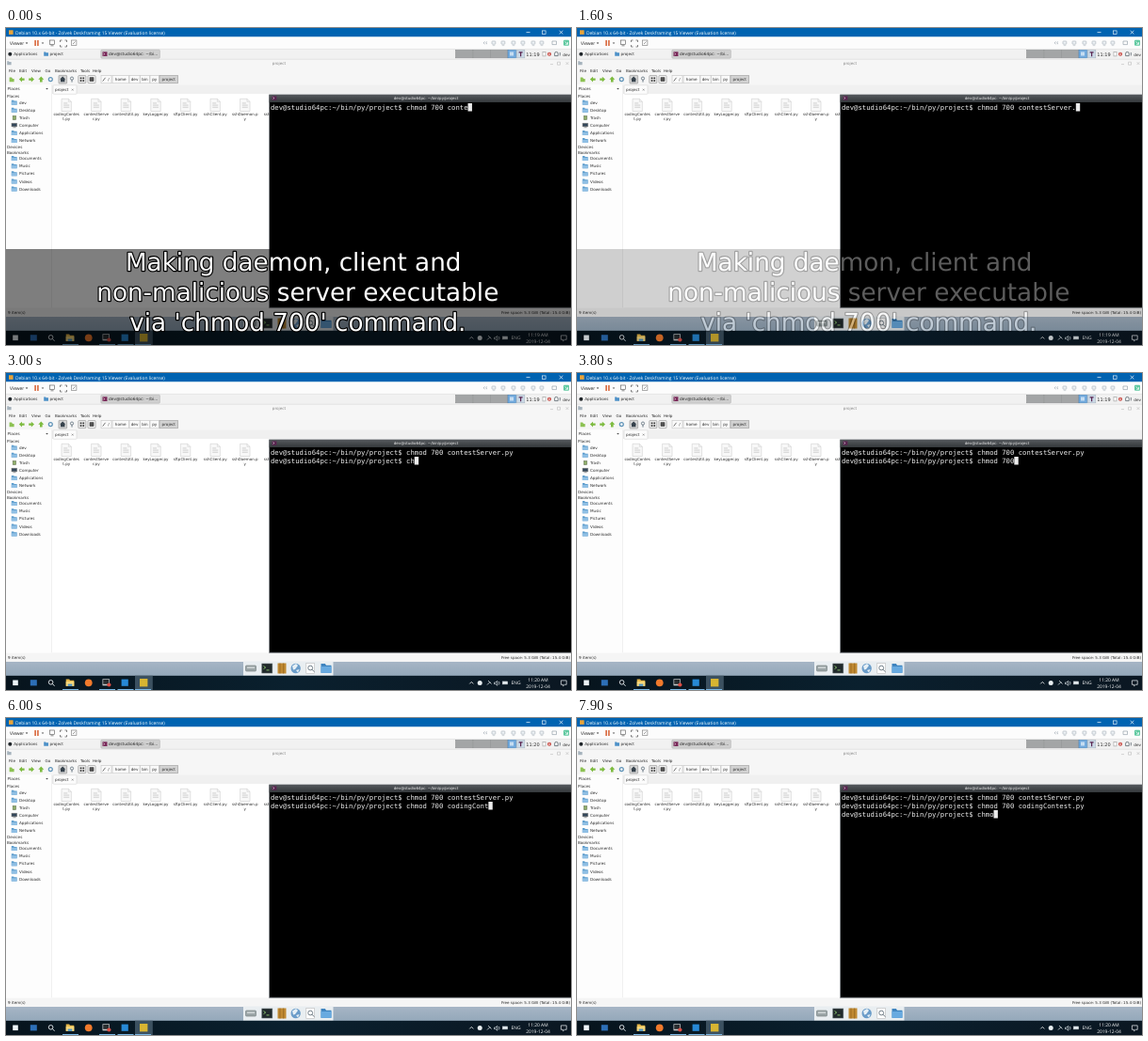
An HTML page for the animation above (8 s loop, 600x337 px).

```html
<!DOCTYPE html>
<html lang="en">
<head>
<meta charset="utf-8">
<title>Terminal session</title>
<style>
  html, body { margin: 0; width: 100%; height: 100%; overflow: hidden; background: #fff; }
  svg { display: block; width: 100vw; height: 100vh; }
  text { white-space: pre; text-rendering: geometricPrecision; }
  .guest { font-family: "DejaVu Sans", sans-serif; font-size: 4.15px; fill: #2b2b2b; }
  .host { font-family: "Open Sans", "Noto Sans", sans-serif; font-size: 4.9px; fill: #222; }
  .shell { font-family: "DejaVu Sans Mono", monospace; font-size: 7.25px; fill: #eee; }
  .caption { font-family: "DejaVu Sans", sans-serif; font-size: 26.25px; fill: #fff;
    stroke: #000; stroke-width: 2.4; stroke-linejoin: round; paint-order: stroke; text-anchor: middle; }
  .mid { text-anchor: middle; }
  .end { text-anchor: end; }
</style>
</head>
<body>
<svg id="stage" viewBox="0 0 600 337" preserveAspectRatio="none">
  <defs>
    <linearGradient id="wall" x2="0" y2="1">
      <stop offset="0" stop-color="#a6b5c5"/><stop offset="1" stop-color="#94a8ba"/>
    </linearGradient>
    <linearGradient id="bar">
      <stop offset="0" stop-color="#07141d"/><stop offset=".5" stop-color="#0a202e"/><stop offset="1" stop-color="#0b1722"/>
    </linearGradient>
    <linearGradient id="head" x2="0" y2="1">
      <stop offset="0" stop-color="#55595d"/><stop offset="1" stop-color="#33373a"/>
    </linearGradient>
  </defs>
  <g id="desk"></g>
  <g id="term"></g>
  <g id="note">
    <rect y="235" width="600" height="102" opacity=".5"/>
    <g class="caption">
      <text x="305.2" y="257.9">Making daemon, client and</text>
      <text x="309.8" y="290">non-malicious server executable</text>
      <text x="309.8" y="322.1">via 'chmod 700' command.</text>
    </g>
  </g>
</svg>
<script>
const USER = 'dev', HOST = 'studio64pc';
const WHERE = `${USER}@${HOST}`;
const PROMPT = `${WHERE}:~/bin/py/project$ `;
const $ = id => document.getElementById(id);

// Markup helpers
const rect = (x, y, w, h, fill, more = '') => `<rect x="${x}" y="${y}" width="${w}" height="${h}" fill="${fill}" ${more}/>`;
const box = (x, y, w, h, fill, stroke, rx = 0) => rect(x, y, w, h, fill, `stroke="${stroke}" stroke-width=".6" rx="${rx}"`);
const dot = (x, y, r, fill, more = '') => `<circle cx="${x}" cy="${y}" r="${r}" fill="${fill}" ${more}/>`;
const line = (d, stroke, w = .7) => `<path d="${d}" fill="none" stroke="${stroke}" stroke-width="${w}"/>`;
const fill = (d, color) => `<path d="${d}" fill="${color}"/>`;
const text = (x, y, s, cls = 'guest', more = '') => `<text x="${x}" y="${y}" class="${cls}" ${more}>${s}</text>`;
const cross = (x, y, r, c, w) => line(`M${x - r} ${y - r}l${2 * r} ${2 * r}m0 ${-2 * r}l${-2 * r} ${2 * r}`, c, w);
const down = (x, y, c) => fill(`M${x - 1.3} ${y - .7}h2.6l-1.3 1.5z`, c);
const lens = (x, y, r, c) => dot(x, y, r, 'none', `stroke="${c}" stroke-width=".9"`) + line(`M${x + r * .7} ${y + r * .7}l${r} ${r}`, c, 1);
const folder = (x, y, w, h, c) => fill(`M${x} ${y}h${w * .4}l${w * .1} ${h * .17}h${w * .5}v${h * .83}h${-w}z`, c);

function hostTop() {
  let s = rect(0, 0, 600, 9.5, '#0063b1') + rect(3, 2.3, 4.6, 4.6, '#e8a33a');
  s += text(10, 6.5, 'Debian 10.x 64-bit - Zolvek Deskframing 15 Viewer (Evaluation license)', 'host', 'style="fill:#fff"');
  s += line('M552.5 4.6h4', '#fff') + box(569.5, 2.9, 3.6, 3.4, 'none', '#fff') + cross(589.5, 4.6, 1.8, '#fff', .7);
  s += rect(0, 9.5, 600, 13, '#fcfcfc') + text(4, 17.8, 'Viewer', 'host') + down(22, 16.2, '#333');
  s += rect(30.3, 13, 1.6, 6, '#d9683c') + rect(33.1, 13, 1.6, 6, '#d9683c') + down(39, 16.2, '#555');
  s += box(46.5, 13, 5, 4.3, 'none', '#555') + line('M47.5 18.8h3', '#555');
  s += line('M57.5 15v-2h2m3 0h2v2m0 3v2h-2m-3 0h-2v-2', '#555') + box(69.5, 13, 5.4, 5.4, 'none', '#777') + line('M71 17l2.5-2.5', '#777');
  s += line('M507 15.8l1.5-1.3m-1.5 1.3l1.5 1.3m2.5-2.6l-1.5 1.3 1.5 1.3', '#8995a0', .6);
  for (const x of [518, 528, 539, 549, 560, 569])
    s += box(x - 2, 14, 3.8, 3.2, '#eef2f5', '#a3adb5', .6) + line(`M${x - 1.3} 18.6h2.6`, '#a3adb5', .5);
  s += line('M580 14h4.5v3.6H580z', '#8995a0', .6);
  return s + rect(592, 12.8, 6, 6, '#5fc9a0', 'rx="1"') + line('M593.5 14.3l3 3m0-2.4v2.4h-2.4', '#fff', .7);
}

function guestPanel() {
  let s = rect(0, 22.5, 600, 10.8, '#f1f1f1') + line('M0 22.4H600', '#d0d0d0', .5);
  s += dot(4.3, 27.8, 2, '#1f2529') + text(8.2, 29.4, 'Applications');
  s += folder(40.2, 25.5, 4.8, 4.2, '#4d91c8') + text(46.5, 29.4, 'project');
  s += box(100.8, 23.2, 62.6, 9, '#cfcfcf', '#b5b5b5', 1) + rect(102.5, 25.3, 5, 4.7, '#7a2a5a');
  s += line('M103.5 26.6l1.3 1.1-1.3 1.1', '#fff', .6) + text(109, 29.4, `${WHERE}: ~/bi...`, 'guest', 'style="font-size:4.35px"');
  for (let i = 0; i < 3; i++) s += box(477.5 + 18.6 * i, 23.4, 18.2, 8.4, '#a3a5a6', '#8f9192');
  s += box(533, 23.4, 8.5, 8.4, '#72aadd', '#4a86bb') + rect(535, 25.5, 4, 4, '#c6ddf1') + box(542.3, 23.4, 8.5, 8.4, '#cad9e6', '#a9b5c0');
  s += line('M544.6 25.8h4m-2 0v4.4', '#5a2550', 1.2);
  s += text(559.5, 29.5, '11:19', 'guest mid', 'id="clock" style="font-size:5px"');
  s += box(570, 25.3, 3, 4.6, '#fff', '#999') + dot(577, 27.8, 2, '#c43c35') + rect(576.5, 26.5, .9, 2.6, '#fff');
  s += line('M582.6 29.6v-2.4a1.8 1.8 0 0 1 3.6 0v2.4zM588.3 26v3.4', '#48555e');
  return s + text(599, 29.5, USER, 'guest end');
}

function fileHead() {
  let s = rect(0, 33.3, 600, 27, '#f6f6f6') + line('M0 33.3H600', '#cfcfcf', .5);
  s += folder(1.2, 35.2, 4.4, 4, '#a6b3bd') + text(290, 38.9, 'project', 'guest mid', 'style="fill:#888"');
  s += line('M578 38.6h3M585.5 36.2h3v3h-3z', '#bbb', .6) + cross(596, 37.6, 1.4, '#bbb', .6);
  'File Edit View Go Bookmarks Tools Help'.split(' ').forEach((m, i) =>
    s += text([3, 14, 27, 41.5, 52, 79, 92][i], 46.5, m));
  s += fill('M3.6 52.5h2.4l1 1.4h1.6v3.4h-5z', '#8cc152');
  s += fill('M13.8 54.6l3.2-2.8v1.6h2.6v2.4H17v1.6z', '#7dbb3f') + fill('M30 54.6l-3.2-2.8v1.6h-2.6v2.4h2.6v1.6z', '#7dbb3f');
  s += fill('M37.3 51.6l3 3.2h-1.7v2.6H36v-2.6h-1.7z', '#7dbb3f');
  s += dot(47.3, 54.6, 2, 'none', 'stroke="#5e93b8" stroke-width="1.2"');
  s += box(56, 50.4, 8.6, 8.6, '#d4d4d4', '#8b8b8b', .6) + fill('M60.2 51.6l3 2.8h-.8v2.8h-4.4v-2.8h-.8z', '#36424c');
  s += dot(70, 53.6, 1.6, 'none', 'stroke="#596a77" stroke-width=".8"') + line('M70 55.2v2.4', '#596a77', .9);
  s += box(76.8, 50.6, 8, 8, '#ececec', '#888', .6) + box(87, 50.6, 8, 8, '#fafafa', '#888', .6);
  for (const x of [78.7, 81.4]) for (const y of [52.5, 55.2]) s += rect(x, y, 1.7, 1.7, '#333');
  s += box(89, 52.7, 4, 3.8, '#555', '#333');
  s += box(101, 50.6, 11, 8.2, '#fafafa', '#c4c4c4') + line('M102.7 56.6l2.8-3.8', '#555', .8) + text(108.2, 56.2, '/');
  [['home', 113], [USER, 131], ['bin', 142.7], ['py', 153], ['project', 163, 19.6]].forEach(([name, x, w], i, all) => {
    const width = w || all[i + 1][1] - x - .6;
    s += box(x, 50.6, width, 8.2, w ? '#d3d3d3' : '#fafafa', w ? '#9a9a9a' : '#c4c4c4') + text(x + width / 2, 56.2, name, 'guest mid');
  });
  return s;
}

function sidebar() {
  let s = rect(0, 60.3, 48, 237, '#fdfdfd') + rect(48, 60.3, 1, 237, '#f0f0f0');
  s += text(1.5, 66, 'Places') + down(43.5, 64.6, '#444');
  for (const [name, y] of [['Places', 73.7], ['Devices', 128], ['Bookmarks', 133.6]]) s += text(1, y, name);
  const rows = [USER, 'Desktop', 'Trash', 'Computer', 'Applications', 'Network', 'Documents', 'Music', 'Pictures', 'Videos', 'Downloads'];
  rows.forEach((name, i) => {
    const y = i < 6 ? 79.2 + 8.08 * i : 138.6 + 8.1 * (i - 6);
    if (i === 2) s += box(7.2, y - 2, 3.4, 4.2, '#8fae6a', '#6d7a5c');
    else if (i === 3) s += box(6, y - 2.2, 5.6, 3.6, '#33475a', '#777') + rect(7.5, y + 2, 3, .7, '#777');
    else s += folder(5.8, y - 2.5, 5.8, 5, '#5e9dcd') + rect(5.8, y - .7, 5.8, 3.2, '#8fbfe4');
    s += text(14, y + 1.6, name);
  });
  return s;
}

function files() {
  let s = rect(49, 60.3, 551, 237, '#fff') + rect(49, 60.3, 551, 9.7, '#f0f0f0');
  s += box(50, 60.8, 25, 9.5, '#fcfcfc', '#d6d6d6', .8) + text(52, 67, 'project') + cross(70.7, 65.6, .9, '#555', .5);
  const names = ['codingContes t.py', 'contestServe r.py', 'contestUtil.py', 'keyLogger.py', 'sftpClient.py', 'sshClient.py', 'sshDaemon.p y', 'sshServer.p y'];
  names.forEach((name, i) => {
    const x = 64.2 + 31.6 * i;
    const page = `M${x - 5.2} 75.3h7.4l3 3v10.2h-10.4z`;
    s += fill(page, '#f8f8f8') + line(page + `M${x + 2.2} 75.3v3h3`, '#cecece', .6);
    for (let k = 0; k < 3; k++) s += rect(x - 3, 79.6 + 2.1 * k, k ? 6 : 4, .7, '#bdbdbd');
    name.split(' ').forEach((part, k) => s += text(x, 93.2 + 5 * k, part, 'guest mid', 'style="font-size:4.05px"'));
  });
  s += rect(0, 297.3, 600, 9.7, '#f5f5f5') + text(2, 304.3, '9 item(s)');
  return s + text(599, 304.3, 'Free space: 5.3 GiB (Total: 15.4 GiB)', 'guest end', 'style="font-size:4.05px"');
}

function bottom() {
  let s = rect(0, 307, 600, 15, 'url(#wall)') + rect(252, 306.5, 95.5, 15.2, '#e9eef1');
  s += box(254.5, 311, 11, 6, '#9ba5a7', '#6f797b', 1) + rect(256, 312.5, 8, 1.4, '#d5dbdc');
  s += box(271.8, 309, 11, 10, '#20292b', '#5a6668') + line('M273.5 311.5l2.2 1.6-2.2 1.6m3 1.2h3', '#9ee07c', .8);
  s += rect(288.5, 308.5, 9, 11, '#c08a32') + line('M291 308.5v11m3.6-11v11', '#87591a', .6);
  s += dot(307.7, 314, 5.2, '#6a9cc9') + fill('M304 311.5l4-2.5 2 2-3 4-2 .5zM308 316l3.5-1-1.5 3.5z', '#e6f0f6');
  s += box(318.8, 308.5, 8.6, 11, '#fff', '#bbb') + lens(323.2, 313.5, 2.4, '#64727c');
  s += folder(334.5, 309, 11, 9.8, '#3f84bf') + rect(334.5, 312, 11, 6.8, '#68aae0');

  s += rect(0, 321.8, 600, 15.2, 'url(#bar)') + rect(7.2, 326.5, 5.6, 5.6, '#eef4f8');
  s += rect(25.8, 326.2, 7, 6.2, '#2d6fb7') + lens(47.6, 328.8, 2.3, '#e8edf0');
  s += folder(63.7, 325.4, 8.6, 7.4, '#e7b84a') + rect(63.7, 328, 8.6, 4.8, '#f6d77b') + rect(65.7, 330.6, 4.6, 2.2, '#4b93c9');
  s += dot(87.7, 329.3, 3.9, '#f17a2c');
  s += rect(102.5, 325.3, 7.4, 7, '#c9ccce') + rect(103.2, 326, 6, 4.8, '#292d30') + dot(109.4, 331.5, 2.1, '#dc4b42');
  s += rect(122.6, 325.6, 7.2, 7.2, '#2789d6') + rect(137, 321.8, 18.8, 15.2, '#3c5160') + rect(142, 325, 8.4, 8.4, '#d8b532');
  for (const x of [60, 99, 118.5, 137]) s += rect(x, 336, 17, 1, '#79b7e4');
  s += line('M492.3 330.4l2-2 2 2', '#fff', .8) + dot(503.2, 329.5, 2.5, '#e8eef1');
  s += line('M512 327l3.5 3.5M511 331.5l3-3', '#dfe6ea', .8) + line('M518.5 329h1.4l1.8-1.6v4.8l-1.8-1.6h-1.4zM523.3 328q1.3 1.6 0 3.4', '#dfe6ea', .7);
  s += box(527.5, 328, 5, 2.8, '#dfe6ea', '#dfe6ea');
  const white = 'style="fill:#fff"';
  s += text(541.5, 331.3, 'ENG', 'host mid', white) + text(565, 328.1, '11:19 AM', 'host mid', 'id="hostClock" style="fill:#fff"') + text(565, 335, '2019-12-04', 'host mid', white);
  return s + line('M589.4 326.9h5.8v4.4h-2l-1.6 1.5v-1.5h-2.2z', '#f4f7f9');
}

function terminal() {
  let s = rect(279.2, 70.6, 321, 227.2, '#6d7175') + rect(279.6, 70.9, 321, 8.4, 'url(#head)') + rect(280, 79, 320, 217.8, '#000');
  s += rect(282.6, 72.4, 4.8, 4.4, '#5a2550') + line('M283.6 73.5l1.2 1-1.2 1', '#fff', .6);
  s += text(446, 75.8, `${WHERE}: ~/bin/py/project`, 'guest mid', 'style="fill:#eee;font-size:4px"');
  for (let i = 0; i < 3; i++) s += text(281, 86.6 + 9 * i, '', 'shell', `id="row${i}"`);
  return s + rect(0, 80, 4.4, 8.5, '#ececec', 'id="caret"');
}

$('desk').innerHTML = hostTop() + guestPanel() + fileHead() + files() + sidebar() + bottom();
$('term').innerHTML = terminal();

// Each command has [ms, characters typed] points
const LOOP = 8000, CELL = 7.25 * 1233 / 2048;
const commands = [
  { text: 'chmod 700 contestServer.py', at: 0, keys: [[0, 15], [700, 18], [1500, 24], [1900, 26]] },
  { text: 'chmod 700 codingContest.py', at: 2500, keys: [[2700, 0], [3750, 9], [5900, 20], [6800, 26]] },
  { text: 'chmod 700', at: 7200, keys: [[7400, 0], [7850, 4]] },
];

function typed(keys, t) {
  if (t <= keys[0][0]) return keys[0][1];
  for (let i = 1; i < keys.length; i++) {
    const [t0, n0] = keys[i - 1], [t1, n1] = keys[i];
    if (t < t1) return Math.floor(n0 + (n1 - n0) * (t - t0) / (t1 - t0));
  }
  return keys[keys.length - 1][1];
}

function draw(now) {
  const t = now % LOOP;
  commands.forEach((c, i) => {
    const n = typed(c.keys, t), shown = t >= c.at;
    $('row' + i).textContent = shown ? PROMPT + c.text.slice(0, n) : '';
    if (shown) {
      $('caret').setAttribute('x', 281 + CELL * (PROMPT.length + n));
      $('caret').setAttribute('y', 80 + 9 * i);
    }
  });
  $('note').setAttribute('opacity', Math.min(1, Math.max(0, (1960 - t) / 1000)));
  $('clock').textContent = t < 4500 ? '11:19' : '11:20';
  $('hostClock').textContent = t < 3000 ? '11:19 AM' : '11:20 AM';
}

const start = performance.now();
function tick() {
  draw(performance.now() - start);
  requestAnimationFrame(tick);
}
tick();
</script>
</body>
</html>
```
